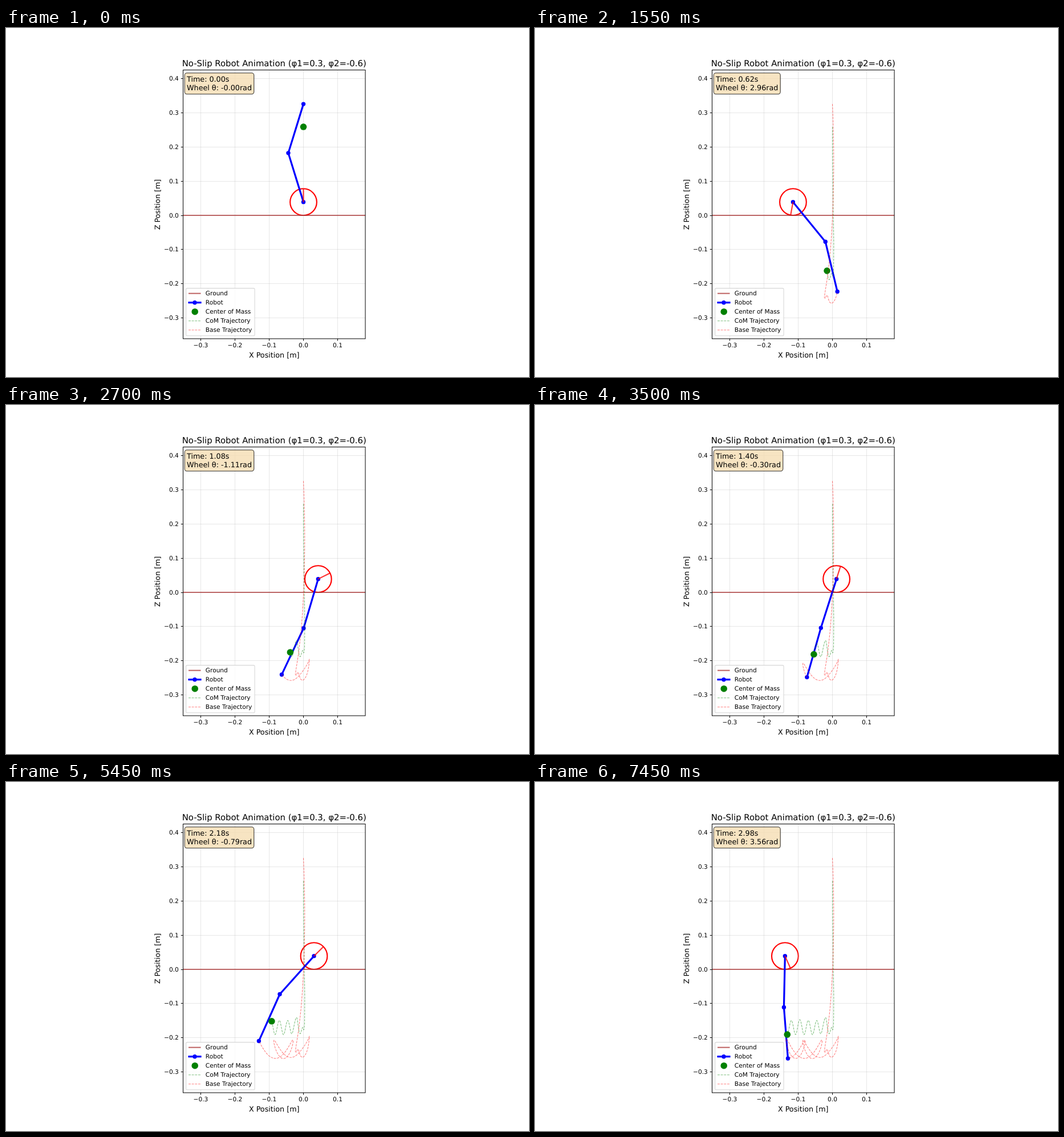
Animation of 917 by 611 pixels, one loop 7.5 s. Source, as an HTML page:

```html
<!DOCTYPE html>
<html lang="en">
<head>
<meta charset="utf-8">
<title>Robot animation</title>
<style>
html, body { margin: 0; width: 100%; height: 100%; overflow: hidden; background: #fff; }
svg { display: block; width: 917px; height: 611px; }
text { font-family: "DejaVu Sans", sans-serif; font-size: 10.61px; fill: #000; text-rendering: geometricPrecision; }
.label { font-size: 12.73px; }
.title { font-size: 14.86px; }
.mid { text-anchor: middle; }
.end { text-anchor: end; }
.grid { stroke: #b0b0b0; stroke-opacity: .3; stroke-width: 1; }
.axis { stroke: #000; stroke-width: 1; fill: none; }
.ground { stroke: #a52a2a; stroke-opacity: .7; stroke-width: 2.1; }
.robot { stroke: #00f; stroke-width: 3.2; fill: none; stroke-linejoin: round; stroke-linecap: square; }
.joint { fill: #00f; }
.com { fill: #008000; }
.trail { fill: none; stroke-width: 1.06; stroke-opacity: .5; stroke-dasharray: 3.93 1.7; stroke-linejoin: round; }
.green { stroke: #008000; }
.red { stroke: #f00; }
.wheel { fill: none; stroke: #f00; stroke-width: 2.12; }
.spoke { stroke: #f00; stroke-opacity: .8; stroke-width: 2.12; }
</style>
</head>
<body>
<svg viewBox="0 0 917 611">
  <clipPath id="plot"><rect x="310.5" y="73.5" width="319.5" height="470.5"/></clipPath>
  <g clip-path="url(#plot)">
    <circle id="wheel" class="wheel" r="23.35"/>
    <g id="grid"></g>
    <path class="ground" d="M310 328H630"/>
    <polyline id="robot" class="robot"/>
    <g id="joints" class="joint"><circle r="3.7"/><circle r="3.7"/><circle r="3.7"/></g>
    <circle id="com" class="com" r="5.8"/>
    <polyline id="comTrail" class="trail green"/>
    <polyline id="baseTrail" class="trail red"/>
    <line id="spoke" class="spoke"/>
  </g>
  <g id="ticks"></g>
  <rect class="axis" x="310.5" y="73.5" width="319.5" height="470.5"/>
  <text class="title mid" x="470.2" y="67">No-Slip Robot Animation (φ1=0.3, φ2=-0.6)</text>
  <text class="label mid" x="470.2" y="577">X Position [m]</text>
  <text class="label mid" transform="translate(270 309) rotate(-90)">Z Position [m]</text>

  <rect id="box" x="313.2" y="78.8" height="37" rx="4" fill="#f5deb3" fill-opacity=".8"
        stroke="#000" stroke-opacity=".8" stroke-width="1.06"/>
  <text id="clock" class="label" x="317" y="93.5"></text>
  <text id="angle" class="label" x="317" y="109.2"></text>

  <rect x="315.7" y="455.6" width="120.4" height="83.2" rx="2.1" fill="#fff" fill-opacity=".8"
        stroke="#ccc" stroke-opacity=".8" stroke-width="1.06"/>
  <path class="ground" d="M320 464.7H341.5"/>
  <path class="robot" d="M321 480.7H341"/>
  <circle class="joint" cx="331" cy="480.7" r="3.7"/>
  <circle class="com" cx="331.2" cy="496.7" r="5.8"/>
  <path class="trail green" d="M320 512.8H341.5"/>
  <path class="trail red" d="M320 528.8H341.5"/>
  <g id="legend"></g>
</svg>
<script>
const $ = id => document.getElementById(id);
const SCALE = 598.6, R = 0.039, LINK = 0.15, BASE_SHARE = 0.767;
const FRAMES = 150, STEP = 50, DT = 0.02;
const SNAP = 0.34;   // the legs pull tight at the end of the fall
const { sin, cos, exp, tanh, PI } = Math;
const px = x => 521.5 + x * SCALE;
const py = z => 328 - z * SCALE;
const bump = (t, mid, width) => exp(-(((t - mid) / width) ** 2));

// Mean leg angle: tips over while falling, then swings like a pendulum
function lean(t) {
  if (t < SNAP + .03) return -.38 * Math.min(1, t / SNAP) ** 2;
  return .61 * sin(2 * PI * (t - .475) / 1.005) - .11 * bump(t, .49, .1);
}

// Knee bend: free fall of the base, then a damped rattle on a slow swing
function bend(t, s) {
  if (t < SNAP - .01) {
    const z = R + 2 * LINK * cos(.3) - 9.81 / 2 * t * t;
    return 2 * Math.acos((R - z) / (2 * LINK * cos(s)));
  }
  const rattle = .95 * exp((SNAP - t) / .18) * cos(2 * PI * (t - SNAP) / .23);
  return rattle - .35 * s - .11 + .22 * tanh(4 * (t - 1.35));
}

// Sideways place of the center of mass: steady after the fall
const drift = t => .006 * bump(t, .38, .13) - .0493 * Math.max(0, t - .2955);

function pose(t) {
  const s = lean(t), d = bend(t, s);
  const wheel = [drift(t) - BASE_SHARE * 2 * LINK * sin(s) * cos(d / 2), R];
  const hang = ([x, z], a) => [x + LINK * sin(a), z - LINK * cos(a)];
  const knee = hang(wheel, s - d / 2);
  const base = hang(knee, s + d / 2);
  const com = wheel.map((v, i) => v + BASE_SHARE * (base[i] - v));
  return { wheel, knee, base, com, theta: -wheel[0] / R };
}

const poses = Array.from({ length: FRAMES }, (_, i) => pose(i * DT));
const toPx = ([x, z]) => [px(x), py(z)];
const points = list => list.map(p => toPx(p).map(v => v.toFixed(2)).join()).join(" ");
const set = (el, attrs) => { for (const k in attrs) el.setAttribute(k, attrs[k]); };

function buildAxes() {
  let grid = "", ticks = "";
  const name = k => (k < 0 ? "\u2212" : "") + (Math.abs(k) / 10).toFixed(1);
  for (let k = -3; k <= 4; k++) {
    const y = Math.floor(py(k / 10)) + .5;
    grid += `<path class="grid" d="M310 ${y}H630"/>`;
    ticks += `<path class="axis" d="M306.8 ${y}H310.5"/><text class="end" x="302.8" y="${y + 3.7}">${name(k)}</text>`;
    if (k > 1) continue;
    const x = Math.floor(px(k / 10)) + .5;
    grid += `<path class="grid" d="M${x} 73V544"/>`;
    ticks += `<path class="axis" d="M${x} 544V547.7"/><text class="mid" x="${x}" y="559.3">${name(k)}</text>`;
  }
  $("grid").innerHTML = grid;
  $("ticks").innerHTML = ticks;
  $("legend").innerHTML = ["Ground", "Robot", "Center of Mass", "CoM Trajectory", "Base Trajectory"]
    .map((s, i) => `<text x="349.8" y="${468.4 + 16 * i}">${s}</text>`).join("");
}

function show(n) {
  const p = poses[n], [wx, wy] = toPx(p.wheel), [cx, cy] = toPx(p.com);
  set($("wheel"), { cx: wx, cy: wy });
  set($("spoke"), { x1: wx, y1: wy,
    x2: wx - R * SCALE * sin(p.theta), y2: wy - R * SCALE * cos(p.theta) });
  const joints = [p.wheel, p.knee, p.base];
  set($("robot"), { points: points(joints) });
  joints.forEach((j, i) => {
    const [x, y] = toPx(j);
    set($("joints").children[i], { cx: x, cy: y });
  });
  set($("com"), { cx, cy });
  const past = poses.slice(0, n + 1);
  set($("comTrail"), { points: points(past.map(q => q.com)) });
  set($("baseTrail"), { points: points(past.map(q => q.base)) });
  $("clock").textContent = `Time: ${(n * DT).toFixed(2)}s`;
  $("angle").textContent = `Wheel θ: ${p.theta.toFixed(2)}rad`;
  set($("box"), { width: $("angle").getComputedTextLength() + 7.6 });
}

let shown = -1;
function tick() {
  const n = Math.floor(performance.now() / STEP) % FRAMES;
  if (n !== shown) show(shown = n);
  requestAnimationFrame(tick);
}
buildAxes();
tick();
</script>
</body>
</html>
```
